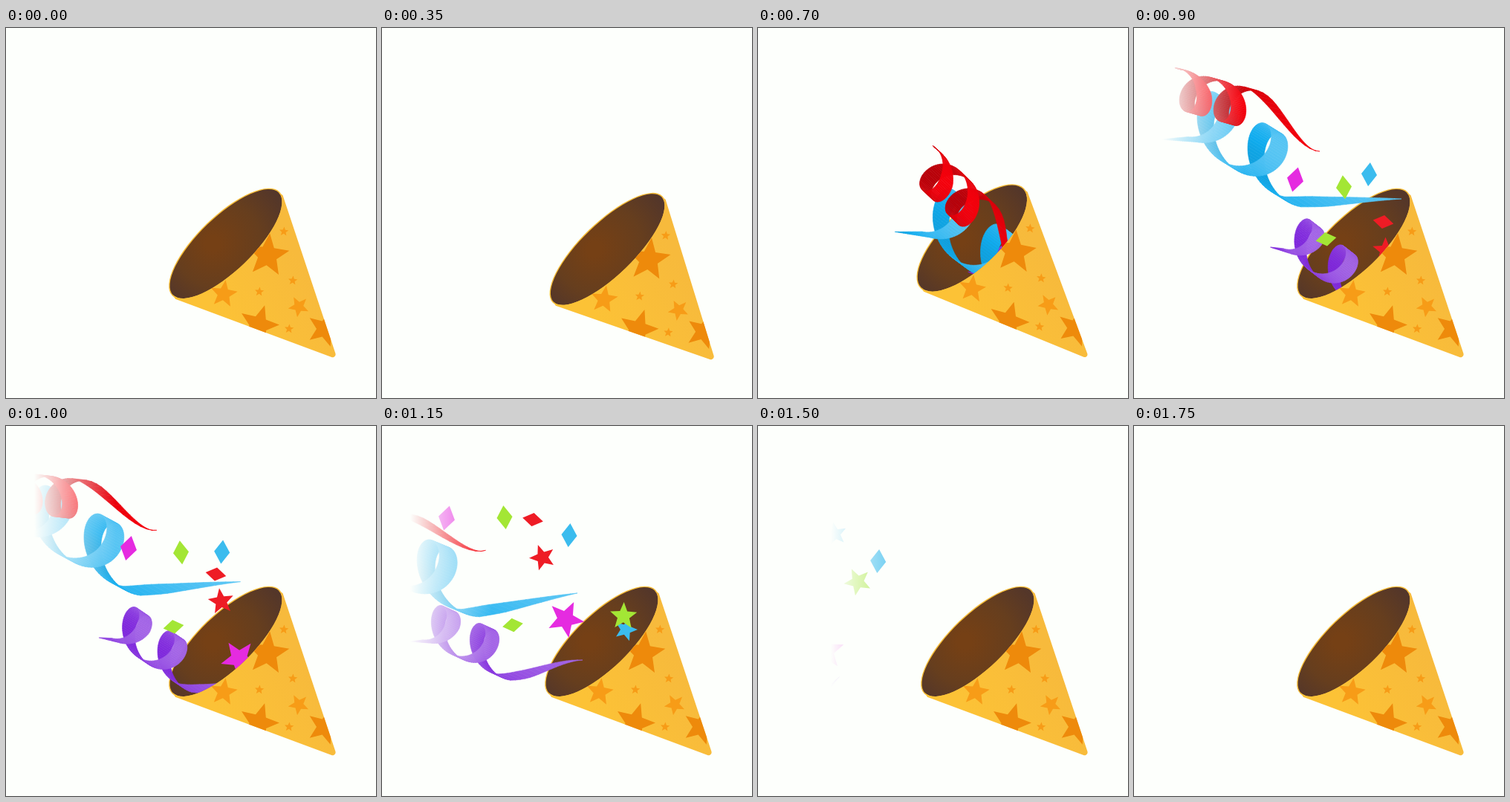
An HTML page with a canvas for the animation above (1.8 s loop, 498 by 498 pixels).

```html
<!DOCTYPE html>
<html lang="en">
<head>
<meta charset="utf-8">
<title>Party popper</title>
<style>
  html, body { margin: 0; width: 100%; height: 100%; overflow: hidden; background: #fdfffc; }
  canvas { display: block; }
</style>
</head>
<body>
<canvas id="stage" width="498" height="498"></canvas>
<script>
const ctx = document.getElementById('stage').getContext('2d');
const SIZE = 498, LOOP = 1800, STEP = 50;
const { PI, sin, cos, min, max, hypot } = Math;
const DEG = PI / 180;
const clamp = (v, lo = 0, hi = 1) => min(hi, max(lo, v));
const smooth = q => q * q * (3 - 2 * q);

function linear(x0, y0, c0, x1, y1, c1) {
  const g = ctx.createLinearGradient(x0, y0, x1, y1);
  g.addColorStop(0, c0);
  g.addColorStop(1, c1);
  return g;
}

function starPath(r) {
  const p = new Path2D();
  for (let i = 0; i < 10; i++) {
    const a = i * 36 * DEG, d = i % 2 ? r * 0.44 : r;
    p.lineTo(d * sin(a), -d * cos(a));
  }
  p.closePath();
  return p;
}

const diamondPath = r => new Path2D(`M0 ${-r}L${r * 0.66} 0L0 ${r}L${-r * 0.66} 0Z`);

function place(path, color, x, y, turn) {
  ctx.save();
  ctx.translate(x, y);
  ctx.rotate(turn * DEG);
  ctx.fillStyle = color;
  ctx.fill(path);
  ctx.restore();
}

// ---- cone ----
const AXIS = 46 * DEG, MOUTH = [296, 290.5], LENGTH = 216, TIP = 443;
const WIDE = 99, NARROW = 36, RIM = 1.5;

// Stage point from distances along and across the cone's axis
const at = (along, across) => [
  MOUTH[0] + along * cos(AXIS) - across * sin(AXIS),
  MOUTH[1] + along * sin(AXIS) + across * cos(AXIS)
];

function mouthPath(grow, end = 2 * PI) {
  const p = new Path2D();
  p.ellipse(...MOUTH, WIDE + grow, NARROW + grow, AXIS - PI / 2, 0, end);
  return p;
}

const rim = mouthPath(RIM), hole = mouthPath(0);

const front = mouthPath(0, PI);
const touch = NARROW ** 2 / LENGTH;
front.lineTo(...at(touch, WIDE + RIM));
front.arcTo(...at(LENGTH, 0), ...at(touch, -WIDE - RIM), 4);
front.lineTo(...at(touch, -WIDE - RIM));
front.closePath();

// Everything beyond the mouth, plus the mouth itself
const outside = new Path2D();
[[0, -900], [0, 900], [-900, 900], [-900, -900]].forEach(p => outside.lineTo(...at(...p)));
outside.closePath();
outside.addPath(hole);

const bodyFill = linear(290, 390, '#fcc236', 400, 320, '#f7ba3c');
const holeFill = ctx.createRadialGradient(278, 290, 10, 290, 290, 100);
holeFill.addColorStop(0, '#754015');
holeFill.addColorStop(0.55, '#663e1e');
holeFill.addColorStop(1, '#53362a');

// x, y, radius, turn
const prints = [
  [352, 306, 30, 6], [343 - 3, 400, 28, 17], [429, 405, 25, 18], [293, 358, 19, 8],
  [394, 375, 14.5, -28], [341, 355, 6.5, 5], [374, 274, 6.5, 5], [386, 340, 6.5, 5],
  [381, 405, 6.5, 5]
];

function conePose(t) {
  let shift = 0, stretch = 1;
  if (t < 550) {
    shift = 21 * (t / 550) ** 4.3;
    stretch = 1 - 0.035 * smooth(clamp(t / 450));
  } else if (t < 700) {
    const q = ((t - 550) / 150) ** 2;
    shift = 21 * (1 - q);
    stretch = 0.965 + 0.085 * q;
  } else {
    stretch = 1.05 - 0.05 * smooth(clamp((t - 700) / 150));
  }
  ctx.translate(TIP + shift, TIP + shift);
  ctx.rotate(45 * DEG);
  ctx.scale(stretch, stretch ** -0.75);
  ctx.rotate(-45 * DEG);
  ctx.translate(-TIP, -TIP);
}

function drawMouth() {
  ctx.fillStyle = '#f6bd38';
  ctx.fill(rim);
  ctx.fillStyle = holeFill;
  ctx.fill(hole);
}

function drawFront() {
  ctx.fillStyle = bodyFill;
  ctx.fill(front);
  ctx.clip(front);
  for (const [x, y, r, turn] of prints) {
    place(starPath(r), r > 22 ? '#ee8a0b' : '#f79c17', x, y, turn);
  }
}

// ---- ribbons: a band wound twice round a cylinder, with a straight head and tail ----
const COILS = 4 * PI, END = PI / 2;

function coil({ pitch, rx, ry, head, tail, width, color }) {
  const unit = pitch.map(v => v / hypot(...pitch));
  const edge = phi => {
    const turn = clamp(phi, 0, COILS), laps = turn / (2 * PI);
    const before = max(0, -phi / END), after = max(0, (phi - COILS) / END);
    const x = pitch[0] * laps + rx * sin(turn) - head * before + tail[0] * after;
    const y = pitch[1] * laps + ry * (cos(turn) - 1) + tail[1] * smooth(after);
    const taper = clamp((phi + END) / PI) * clamp(1.3 * (1 - after));
    const [wx, wy] = unit.map(v => v * width * taper / 2);
    return [[x - wx, y - wy], [x + wx, y + wy]];
  };
  const count = 160, span = COILS + 2 * END, parts = [];
  for (let i = 0; i < count; i++) {
    const phi = -END + span * i / count;
    const [a, b] = edge(phi), [c, d] = edge(phi + span / count);
    const path = new Path2D();
    [a, b, d, c].forEach(p => path.lineTo(...p));
    path.closePath();
    parts.push({ path, depth: sin(phi), color: color(sin(phi)) });
  }
  return parts.sort((p, q) => p.depth - q.depth);
}

// Poses are x, y, turn of the ribbon's head at these times
const TIMES = [700, 900, 1150, 1350];
const ribbons = [
  {
    pitch: [52, 24], rx: 22, ry: 28, head: 22, tail: [106, -23], width: 20,
    color: s => `hsl(269 72% ${58 + 7 * s}%)`,
    poses: [[304, 334, 15], [205, 300, 13], [60, 290, 0], [-32, 350, -20]]
  },
  {
    pitch: [68, 42], rx: 31, ry: 39, head: 42, tail: [146, -4], width: 26,
    color: s => `hsl(198 87% ${56 + 9 * s}%)`,
    poses: [[226, 278, 5], [78, 150, 0], [-28, 190, -9], [-107, 298, -18]]
  },
  {
    pitch: [46, 13], rx: 22, ry: -27, head: 0, tail: [98, 85], width: 21,
    color: s => `hsl(357 100% ${42 + 6 * s}%)`,
    poses: [[239, 162, 28], [60, 55, 0], [-77, 128, -20], [-169, 296, -35]]
  }
].map(r => ({ poses: r.poses, parts: coil(r) }));

// Cubic through the four poses
function poseAt(poses, t) {
  const weights = TIMES.map(a => TIMES.reduce((w, b) => a === b ? w : w * (t - b) / (a - b), 1));
  return poses[0].map((_, n) => poses.reduce((sum, p, i) => sum + p[n] * weights[i], 0));
}

function drawRibbon({ poses, parts }, t) {
  const [x, y, turn] = poseAt(poses, t);
  ctx.save();
  ctx.translate(x, y);
  ctx.rotate(turn * DEG);
  ctx.lineWidth = 0.6;
  ctx.lineJoin = 'round';
  for (const { path, color } of parts) {
    ctx.fillStyle = ctx.strokeStyle = color;
    ctx.fill(path);
    ctx.stroke(path);
  }
  ctx.restore();
}

// ---- confetti: thrown pieces under gravity ----
const RED = '#ee1c25', GREEN = '#a3e635', BLUE = '#3bbcee', PINK = '#e52be0';
const MIDWAY = 1150;
const kinds = [
  { shape: diamondPath, gravity: 0.001, spin: 0 },
  { shape: starPath, gravity: 0.0019, spin: -0.08 }
];
// kind, colour, radius, then place, speed per ms and turn at the midway time
const confetti = [
  [0, PINK, 17, 87, 124, -0.52, -0.195, 13],
  [0, BLUE, 16, 252, 147, -0.258, -0.075, 5],
  [0, GREEN, 16, 165, 123, -0.47, -0.24, -6],
  [0, RED, 14, 203, 126, -0.53, -0.415, 100],
  [0, GREEN, 14, 176, 268, -0.33, 0.06, 81],
  [1, RED, 18, 216, 177, -0.49, -0.252, -20],
  [1, PINK, 25.5, 247, 260, -0.445, -0.21, 26],
  [1, BLUE, 16, 328, 274, -0.64, -0.7, 18],
  [1, GREEN, 19, 325, 256, -0.545, -0.465, 2]
].map(([kind, color, r, ...move]) => ({ ...kinds[kind], color, path: kinds[kind].shape(r), move }));

function drawPiece({ path, color, gravity, spin, move: [x, y, vx, vy, turn] }, t) {
  const dt = t - MIDWAY;
  place(path, color, x + vx * dt, y + vy * dt + gravity * dt * dt / 2, turn + spin * dt);
}

// Everything pales towards the left; near the end the paleness sweeps right
function drawVeil(t) {
  const x = 38 + max(0, t - 1400) * 0.6;
  ctx.fillStyle = linear(x, 0, 'rgba(253,255,252,1)', x + 110, 0, 'rgba(253,255,252,0)');
  ctx.fillRect(0, 0, 212, SIZE);
}

function posed(t, paint) {
  ctx.save();
  conePose(t);
  paint();
  ctx.restore();
}

function draw(t) {
  ctx.fillStyle = '#fdfffc';
  ctx.fillRect(0, 0, SIZE, SIZE);
  posed(t, drawMouth);
  if (t >= 650 && t < 1700) {
    posed(t, () => {
      ctx.clip(outside);
      ctx.resetTransform();
      ribbons.forEach(r => drawRibbon(r, t));
      if (t >= 750) confetti.forEach(c => drawPiece(c, t));
    });
    drawVeil(t);
  }
  posed(t, drawFront);
}

const start = performance.now();
function tick() {
  const t = (performance.now() - start) % LOOP;
  draw(Math.floor(t / STEP) * STEP);
  requestAnimationFrame(tick);
}
draw(0);
requestAnimationFrame(tick);
</script>
</body>
</html>
```
